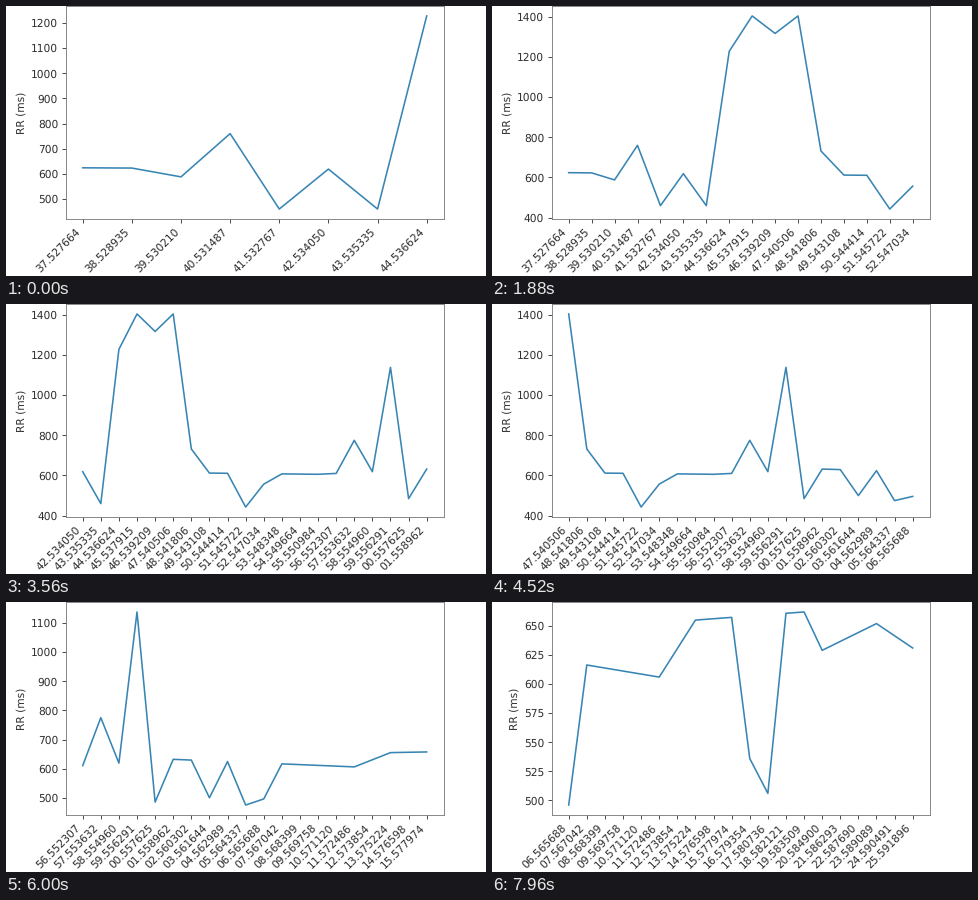
These frames come from a looping animation (480x270 px, 8 s). A matplotlib script:

```python
import matplotlib.pyplot as plt
import numpy as np
from matplotlib.animation import FuncAnimation

W, H, DPI = 480, 270, 80
FRAMES, INTERVAL = 200, 40
SAMPLES, WINDOW = 49, 20
S = 0.954  # size of text and strokes relative to the defaults
INK, FRAME, BLUE = "#303030", "#777777", "#3885b4"

# Resting rhythm (ms), with ectopic beats and pauses on top
REST = [(0, 624), (18, 606), (24, 632), (34, 606), (36, 655),
        (42, 662), (43, 629), (46, 652), (48, 631)]
ECTOPIC = {2: 588, 3: 760, 4: 460, 6: 460, 7: 1228, 8: 1404, 9: 1317,
           10: 1404, 11: 732, 14: 443, 15: 557, 20: 775, 22: 1138,
           23: 485, 26: 500, 28: 475, 29: 496, 39: 536, 40: 506}
# Sample index and the frame at which it joins the plot
PACE = [(7, 0), (8, 14), (9, 20), (19, 64), (48, 195.2)]


def along(points, i):
    return float(np.interp(i, *zip(*points)))


def stamp(i):
    """Time label: one sample per second, slowly drifting late."""
    micros = round(527664 + 1270 * i + 1.42 * i * i)
    return f"{(37 + i) % 60:02d}.{micros:06d}"


RR = [ECTOPIC.get(i, along(REST, i)) for i in range(SAMPLES)]
LABELS = [stamp(i) for i in range(SAMPLES)]
ARRIVALS = [round(along(PACE, i)) for i in range(SAMPLES)]

plt.rcParams.update({
    "font.family": "DejaVu Sans",
    "font.size": 10 * S,
    "text.hinting": "none",
    "lines.linewidth": 1.5 * S,
    "axes.linewidth": 0.8 * S,
    "axes.labelpad": 4 * S,
    "axes.edgecolor": FRAME,
    "axes.labelcolor": INK,
})
for axis in ("xtick", "ytick"):
    plt.rcParams.update({
        f"{axis}.major.size": 3.5 * S,
        f"{axis}.major.pad": 3.5 * S,
        f"{axis}.major.width": 0.8 * S,
        f"{axis}.color": INK,
    })

fig = plt.figure(figsize=(W / DPI, H / DPI), dpi=DPI, facecolor="white")
ax = fig.add_axes([59.5 / W, 57.3 / H, 378.4 / W, 212.4 / H])
ax.set_ylabel("RR (ms)")
line, = ax.plot([], [], color=BLUE)


def padded(lo, hi):
    pad = 0.05 * (hi - lo)
    return lo - pad, hi + pad


def update(frame):
    end = sum(a <= frame for a in ARRIVALS)
    start = max(0, end - WINDOW)
    values = RR[start:end]
    xs = range(len(values))
    line.set_data(xs, values)
    ax.set_xticks(xs, LABELS[start:end], rotation=45, ha="right")
    ax.set_xlim(*padded(0, len(values) - 1))
    ax.set_ylim(*padded(min(values), max(values)))
    return line,


anim = FuncAnimation(fig, update, frames=FRAMES, interval=INTERVAL,
                     init_func=lambda: update(0), repeat=True, repeat_delay=0)
plt.show()
```
